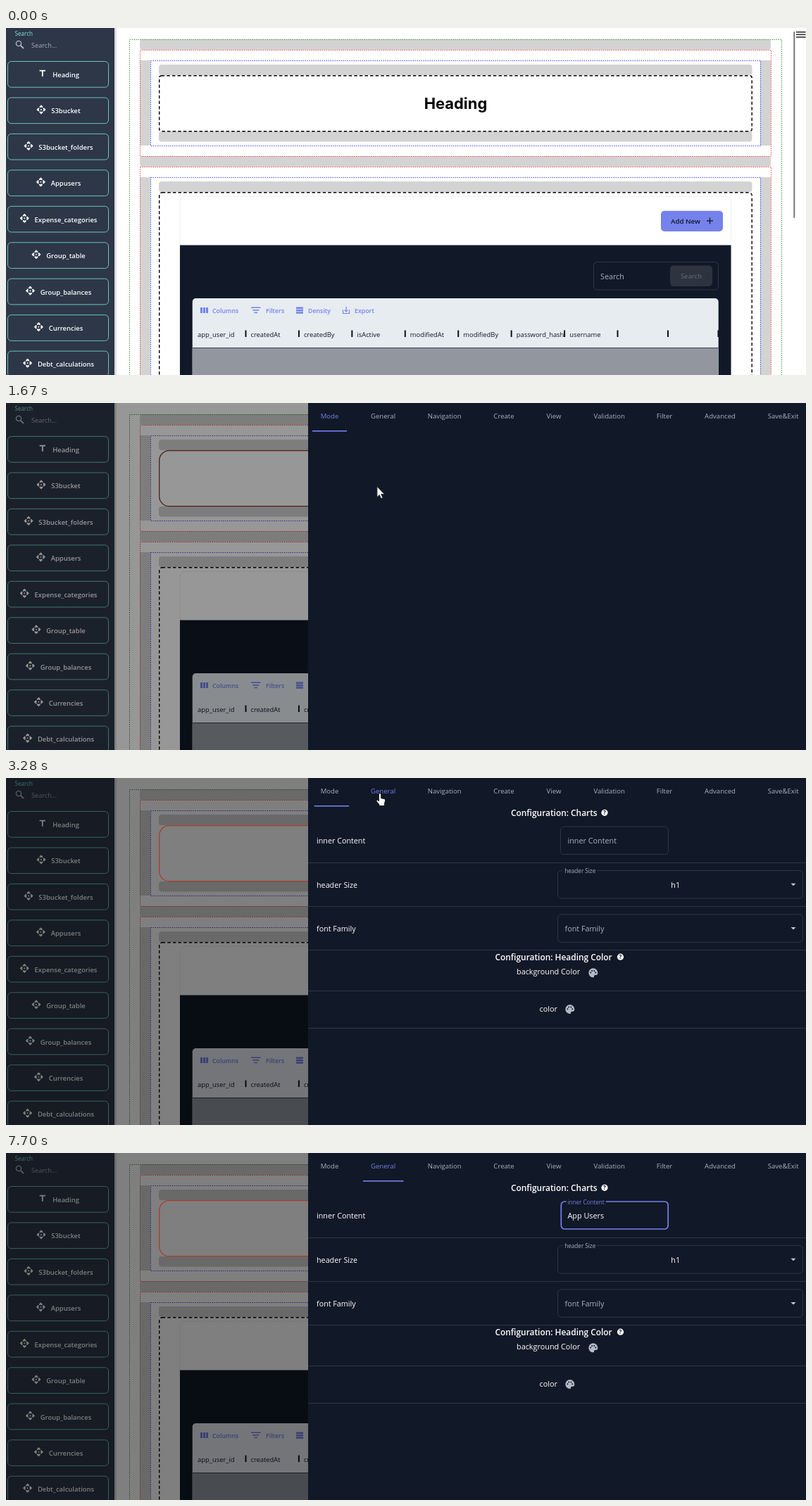
Write an HTML page with a canvas that moves like this. It is 1136 px wide and 493 px high and loops after 8000 ms.

```html
<!DOCTYPE html>
<html lang="en">
<head>
<meta charset="utf-8">
<title>Page builder</title>
<style>
html, body { margin: 0; width: 100%; height: 100%; overflow: hidden; background: #fff; }
canvas { display: block; }
</style>
</head>
<body>
<canvas id="stage" width="1136" height="493"></canvas>
<script>
const W = 1136, H = 493, LOOP = 8000;
const c = document.getElementById('stage').getContext('2d');
const SANS = '"Open Sans", "Noto Sans", sans-serif';
const BLUE = '#7582eb', NAVY = '#111827', LINE = '#2d3748', MUTED = '#a9b2bf', GREY = '#d3d3d3', TEAL = '#76d2c7';
const DOTS = [1.5, 1.5], DASHES = [4.5, 3.1];

const apiIcon = new Path2D('M14 12l-2 2-2-2 2-2zM12 6l2.1 2.1 2.5-2.5L12 1 7.4 5.6l2.5 2.5zM6 12l2.1-2.1-2.5-2.5L1 12l4.6 4.6 2.5-2.5zM18 12l-2.1 2.1 2.5 2.5L23 12l-4.6-4.6-2.5 2.5zM12 18l-2.1-2.1-2.5 2.5L12 23l4.6-4.6-2.5-2.5z');
const textIcon = new Path2D('M5 4v3h5.5v12h3V7H19V4z');
const arrow = new Path2D('M0 0V14.6L3.3 11.6L5.6 16.8L7.8 15.8L5.6 10.7H10.2Z');
const hand = new Path2D('M-1.6 1.4Q0-1 1.6 1.4V7.2L6 8Q7.8 8.6 7.6 10.6L6.4 15V18H-1.2V16L-5 11.4Q-5.2 9.4-3.4 9.8L-1.6 11.4Z');

const clamp = v => Math.max(0, Math.min(1, v));
const mix = (a, b, p) => a + (b - a) * p;

function bezier(x1, y1, x2, y2) {
  const at = (a, b, s) => 3 * (1 - s) * (1 - s) * s * a + 3 * (1 - s) * s * s * b + s * s * s;
  return x => {
    if (x <= 0 || x >= 1) return clamp(x);
    let lo = 0, hi = 1;
    for (let i = 0; i < 18; i++) {
      const mid = (lo + hi) / 2;
      if (at(x1, x2, mid) < x) lo = mid; else hi = mid;
    }
    return at(y1, y2, lo);
  };
}
const easeInOut = bezier(.4, 0, .2, 1);
const easeOut = bezier(0, 0, .2, 1);

function text(s, x, y, size, color, { weight = 400, align = 'left', font = SANS } = {}) {
  c.font = `${weight} ${size}px ${font}`;
  c.textAlign = align;
  c.fillStyle = color;
  c.fillText(s, x, y);
}

function rect(x, y, x2, y2, color) {
  c.fillStyle = color;
  c.fillRect(x, y, x2 - x, y2 - y);
}

function roundPath(x, y, x2, y2, r) {
  c.beginPath();
  c.roundRect(x, y, x2 - x, y2 - y, r);
}

function fillRound(x, y, x2, y2, r, color) {
  roundPath(x, y, x2, y2, r);
  c.fillStyle = color;
  c.fill();
}

function strokeRound(x, y, x2, y2, r, color, width = 1, dash = []) {
  roundPath(x, y, x2, y2, r);
  c.strokeStyle = color;
  c.lineWidth = width;
  c.setLineDash(dash);
  c.stroke();
  c.setLineDash([]);
}

function line(color, width, ...pts) {
  c.beginPath();
  for (let i = 0; i < pts.length; i += 2) c.lineTo(pts[i], pts[i + 1]);
  c.strokeStyle = color;
  c.lineWidth = width;
  c.stroke();
}

function dot(x, y, r, color) {
  c.beginPath();
  c.arc(x, y, r, 0, 7);
  c.fillStyle = color;
  c.fill();
}

function drawPath(path, x, y, scale, color, outline) {
  c.save();
  c.translate(x, y);
  c.scale(scale, scale);
  c.fillStyle = color;
  c.fill(path);
  if (outline) {
    c.strokeStyle = outline;
    c.lineWidth = .8;
    c.stroke(path);
  }
  c.restore();
}

const items = ['Heading', 'S3bucket', 'S3bucket_folders', 'Appusers', 'Expense_categories',
  'Group_table', 'Group_balances', 'Currencies', 'Debt_calculations'];

function sidebar() {
  rect(0, 0, 154, H, LINE);
  rect(154, 0, 157, H, '#dedede');
  text('Search', 12.5, 11, 8.1, '#81e6d9');
  c.beginPath();
  c.arc(18, 22, 3.6, 0, 7);
  c.strokeStyle = '#b4bac3';
  c.lineWidth = 1.4;
  c.stroke();
  line('#b4bac3', 1.8, 20.8, 24.8, 25, 29);
  text('Search...', 36, 28, 9.2, '#a4abb6');
  items.forEach((name, i) => {
    const y = 47.5 + i * 51.45;
    strokeRound(2.5, y, 145.5, y + 36.7, 5, TEAL, .9);
    text(name, 85, y + 22.3, 9.45, '#fff', { weight: 600, align: 'center' });
    const x = 85 - c.measureText(name).width / 2 - 14.3;
    const k = .6;
    drawPath(i ? apiIcon : textIcon, x - 12 * k, y + 17 - 12 * k, k, '#fff');
  });
}

function section(top, bottom) {
  rect(190, top + 15, 205, bottom - 15, GREY);
  rect(1071, top + 15, 1086, bottom - 15, GREY);
  strokeRound(190.5, top + .5, 1086.5, bottom + .5, 0, '#ff4a4a', 1, DOTS);
  strokeRound(205.5, top + 15.5, 1071.5, bottom - 14.5, 0, '#4a4af2', 1, DOTS);
  fillRound(217, top + 21, 1059.5, top + 36, 4, GREY);
}

const headers = ['app_user_id', 'createdAt', 'createdBy', 'isActive', 'modifiedAt', 'modifiedBy', 'password_hash', 'username'];

function table() {
  strokeRound(247, 239, 1029.5, 520, 8, '#eceef1');
  rect(247, 308.5, 1029.5, H, NAVY);
  fillRound(930, 259.7, 1018, 289, 5, BLUE);
  text('Add New', 944, 278, 9.7, NAVY, { weight: 600 });
  line(NAVY, 1.3, 995, 274, 1004, 274);
  line(NAVY, 1.3, 999.5, 269.5, 999.5, 278.5);

  strokeRound(834.5, 332.5, 1011.5, 372, 5, LINE);
  text('Search', 844, 356.5, 10.75, MUTED);
  fillRound(943, 337.5, 1003, 367, 5, '#2d333f');
  text('Search', 973, 356, 9.25, '#5c636f', { weight: 600, align: 'center' });

  fillRound(264.7, 384, 1011.7, 500, [5, 5, 0, 0], '#e7ecf1');
  rect(264.7, 454, 1011.7, H, '#92979f');
  rect(264.7, 454, 1011.7, 455, '#3d434c');
  for (let i = 0; i < 3; i++) {
    rect(276 + i * 4, 397, 279 + i * 4, 405, BLUE);
    rect(348 + i * 2.2, 396.5 + i * 3.6, 361.5 - i * 2.2, 398 + i * 3.6, BLUE);
    rect(412, 396.5 + i * 3.4, 422, 399 + i * 3.4, BLUE);
  }
  line(BLUE, 1.2, 478.5, 400.5, 478.5, 405.5, 487.5, 405.5, 487.5, 400.5);
  line(BLUE, 1.2, 483, 396, 483, 403);
  line(BLUE, 1.2, 480.6, 400.6, 483, 403, 485.4, 400.6);
  const tools = [['Columns', 293], ['Filters', 369], ['Density', 429], ['Export', 495]];
  for (const [s, x] of tools) text(s, x, 404.6, 8.8, BLUE, { weight: 600 });
  headers.forEach((s, i) => text(s, 272 + i * 75.45, 438.5, 9.4, '#111827'));
  for (let i = 0; i < 10; i++) {
    const x = i < 8 ? 340.5 + i * 75.43 : 940 + (i - 8) * 71.5;
    rect(x - 1, 429.5, Math.min(x + 1, 1012), 439, '#111');
  }
}

function page(round, opened) {
  rect(0, 0, W, H, '#fff');
  sidebar();
  fillRound(190, 16, 1086, 31, 4, GREY);
  fillRound(190, 182, 1086, 197, 4, GREY);
  strokeRound(175.5, 16.5, 1101.5, 520, 0, '#3f983f', 1, DOTS);
  section(31, 182);
  section(197, 560);
  fillRound(217, 147, 1059.5, 161.5, 4, GREY);
  if (!opened) strokeRound(217.7, 67.7, 1059.2, 146.7, mix(3, 14, round), '#000', 1.4, DASHES);
  strokeRound(217.7, 233.7, 1059.2, 560, 4, '#000', 1.4, DASHES);
  text('Heading', 638.5, 115, 21.9, '#000', { weight: 700, align: 'center', font: 'Inter, sans-serif' });
  table();
  fillRound(1118.3, 5, 1120.3, 270, 1, '#777');
  for (let i = 0; i < 3; i++) rect(1122, 5 + i * 3.6, 1135.5, 6.5 + i * 3.6, '#222');
}

const tabs = [['Mode', 459.5], ['General', 535.5], ['Navigation', 622.7], ['Create', 707], ['View', 778],
  ['Validation', 856.7], ['Filter', 935], ['Advanced', 1014], ['Save&Exit', 1103.7]];

function help(x, y) {
  dot(x, y, 4.6, '#fff');
  text('?', x, y + 2.9, 8, NAVY, { weight: 700, align: 'center' });
}

function palette(x, y) {
  dot(x, y, 6.5, '#b3bac5');
  for (const [dx, dy] of [[-3.5, -.3], [-1.6, -2.9], [1.6, -2.9], [3.5, -.3]]) dot(x + dx, y + dy, 1, NAVY);
  c.beginPath();
  c.moveTo(x + 1.4, y + 7);
  c.quadraticCurveTo(x + .4, y + 3.2, x + 3, y + 3.2);
  c.lineTo(x + 7, y + 2.8);
  c.lineTo(x + 7, y + 7);
  c.fillStyle = NAVY;
  c.fill();
}

function select(y) {
  strokeRound(783.5, y, 1131.5, y + 39.5, 5, LINE);
  c.beginPath();
  c.moveTo(1114.5, y + 18.2);
  c.lineTo(1121.5, y + 18.2);
  c.lineTo(1118, y + 21.8);
  c.fillStyle = '#c3c9d2';
  c.fill();
}

const PHRASE = 'App Users';
const keyTimes = [5590, 5790, 5990, 6180, 6710, 7040, 7170, 7300, 7500];
const caretOn = [[4330, 4860], [5390, 6650], [6710, 7700]];

function input(t) {
  const p = easeOut(clamp((t - 4320) / 200));
  const focused = t >= 4320;
  if (focused) strokeRound(788.3, 69, 940.2, 108, 5, BLUE, 1.7);
  else strokeRound(787.5, 69, 940.5, 108.5, 5, LINE);
  if (focused) rect(795.5, 67, mix(796, 852, p), 71, NAVY);
  text('inner Content', 797.5, mix(93, 72.6, p), mix(10.8, 8.1, p), focused ? BLUE : MUTED);
  const typed = PHRASE.slice(0, keyTimes.filter(k => t >= k).length);
  text(typed, 797.5, 93.3, 10.85, '#fff');
  if (caretOn.some(([a, b]) => t >= a && t < b)) {
    const x = Math.round(797 + c.measureText(typed).width);
    rect(x, 81, x + 1, 97, '#fff');
  }
}

function settings(t) {
  const title = { weight: 600 };
  text('Configuration: Charts', 717, 54, 11.9, '#fff', title);
  help(850, 49.3);
  text('Configuration: Heading Color', 694.5, 259, 11.9, '#fff', title);
  help(872.5, 254.2);
  for (const y of [120, 182, 244, 302, 355]) rect(429, y, W, y + 1, LINE);
  ['inner Content', 'header Size', 'font Family'].forEach((s, i) => text(s, 441, 93.2 + i * 62.4, 10.75, '#fff'));
  input(t);
  select(131.5);
  rect(790.5, 130, 839, 133, NAVY);
  text('header Size', 793.3, 134.8, 8.15, MUTED);
  text('h1', 950.7, 155.6, 10.8, '#fff', { align: 'center' });
  select(193.8);
  text('font Family', 793.5, 217.6, 10.8, MUTED);
  text('background Color', 725, 279.4, 10.85, '#fff');
  palette(833.8, 276.8);
  text('color', 757.5, 331.6, 10.85, '#fff');
  palette(800.8, 328.5);
}

function drawer(t) {
  const fade = easeInOut(clamp((t - 1550) / 225));
  rect(0, 0, 429, H, `rgba(0,0,0,${.5 * fade})`);
  const tint = easeInOut(clamp((t - 1620) / 150));
  strokeRound(217.7, 67.7, 1059.2, 146.7, 14, `rgb(${168 * tint},${62 * tint},${44 * tint})`, 1.3);
  rect(429, 0, W, H, NAVY);
  const general = t >= 3280;
  const active = general ? 1 : 0;
  tabs.forEach(([s, x], i) => {
    const hot = i === active || (i === 1 && t >= 2520);
    text(s, x, 21.6, 9.6, hot ? BLUE : MUTED, { align: 'center' });
  });
  const slide = general ? easeInOut(clamp((t - 3246) / 300)) : 0;
  rect(mix(435, 507, slide), 39, mix(484, 564.5, slide), 40.6, BLUE);
  if (general) settings(t);
}

// Each move: start, end, from x, from y, to x, to y
const moves = [
  [270, 820, 560, 32, 527, 118],
  [1850, 2060, 527, 118, 510, 54],
  [2120, 2520, 510, 54, 531, 22],
  [2760, 2780, 531, 22, 531, 21],
  [3540, 4130, 531, 21, 862, 85]
];
const clicks = [[1260, 1460], [2980, 3140], [4330, 4530]];

function pointerAt(t) {
  const [a, b, x, y, x2, y2] = moves.filter(m => t >= m[0]).pop();
  const p = easeInOut(clamp((t - a) / (b - a)));
  return [mix(x, x2, p), mix(y, y2, p)];
}

function pointer(t) {
  if (t < 270 || t >= 5390) return;
  const [x, y] = pointerAt(t);
  if (clicks.some(([a, b]) => t >= a && t < b)) dot(x - .5, y, 10.8, 'rgba(240,225,0,.6)');
  if (t >= 1590 && y < 41) {
    drawPath(hand, x, y + .5, 1, '#fff', '#000');
  } else if (t >= 3280 && x > 787 && y > 68) {
    line('#f4f4e4', 1.2, x, y - 7, x, y + 7);
    for (const dy of [-7, 7]) line('#f4f4e4', 1.2, x - 4, y + dy, x + 4, y + dy);
  } else {
    drawPath(arrow, x, y + .8, 1, '#fff', '#333');
  }
}

function draw(t) {
  const opened = t >= 1590;
  page(clamp((t - 560) / 150), opened);
  if (opened) drawer(t);
  pointer(t);
}

const start = performance.now();
function tick() {
  draw((performance.now() - start) % LOOP);
  requestAnimationFrame(tick);
}
tick();
</script>
</body>
</html>
```
